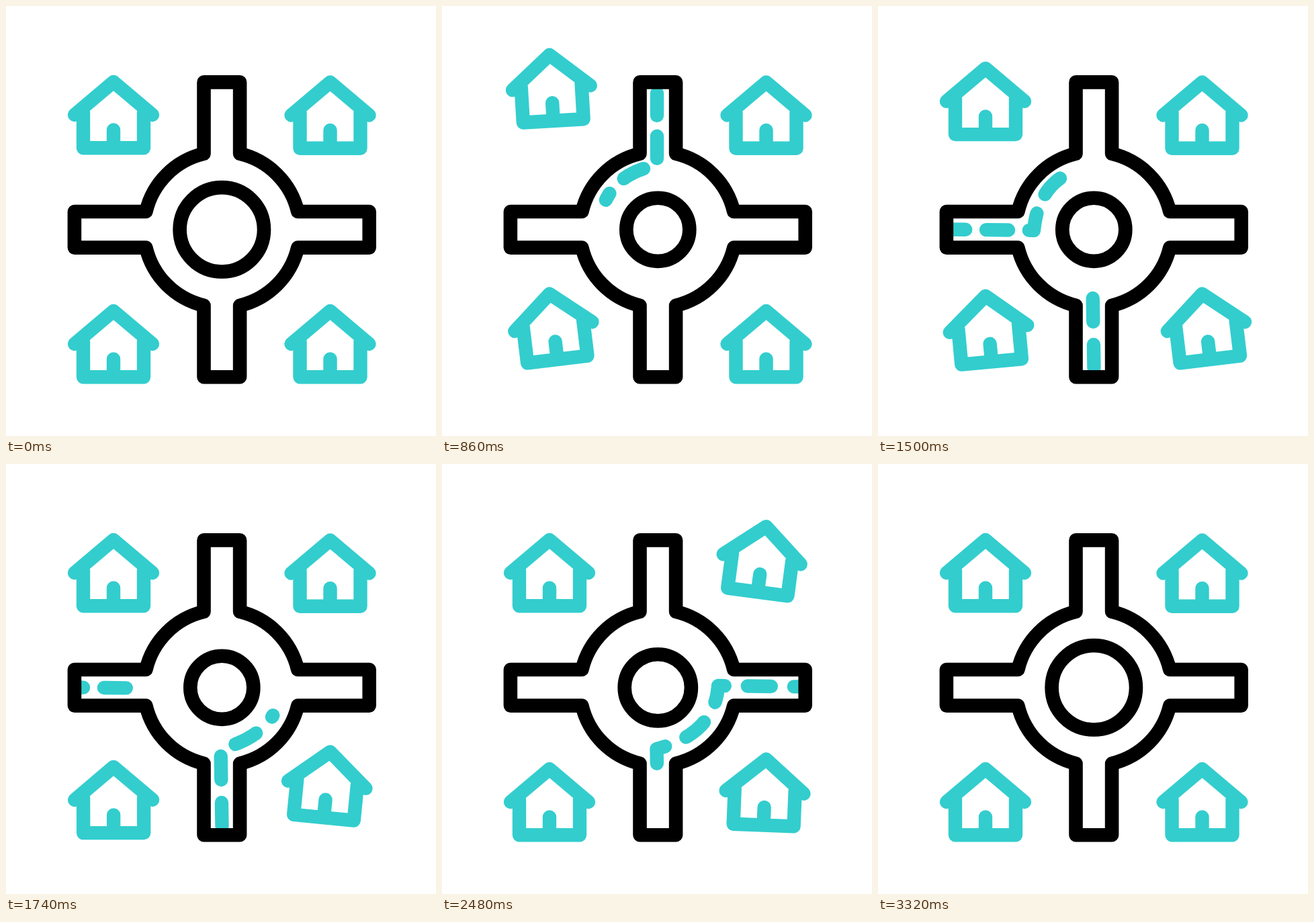
These frames come from a looping animation (640 by 640 pixels, 3.5 s). An HTML page with a canvas:

```html
<!DOCTYPE html>
<html lang="en">
<head>
<meta charset="utf-8">
<title>Roundabout</title>
<style>
html, body { margin: 0; width: 100%; height: 100%; overflow: hidden; background: #fff; }
canvas { display: block; width: 640px; height: 640px; }
</style>
</head>
<body>
<canvas id="stage" width="640" height="640"></canvas>
<script>
const ctx = document.getElementById('stage').getContext('2d');
const LOOP = 3500, STEP = 20, RISE = 180;
const TEAL = '#33cdce', INK = '#000';
const CX = 321.3, CY = 332.8;

const ramp = (t, from, to) => Math.min(1, Math.max(0, (t - from) / (to - from)));
const ease = p => (1 - Math.cos(Math.PI * p)) / 2;

// A sine swing that freezes after a number of turns; 3/4 turn holds at -1.
function swing(t, from, period, turns) {
  const n = Math.min(turns, Math.max(0, (t - from) / period));
  return Math.sin(2 * Math.PI * n);
}

// Each house hangs from its roof peak (x, y). The upper ones rock to rest,
// the lower ones stay leaning until they drop.
const houses = [
  { x: 160, y: 113, lift: 40.2, up: 220, down: [1400, 1600],
    amp: -8, from: 309, period: 385, turns: 3 },
  { x: 160, y: 454, lift: 25.5, up: 370, down: [1400, 1840],
    amp: 6.9, from: 370, period: 640, turns: 0.75 },
  { x: 482.5, y: 454, lift: 25.5, up: 1320, down: [2280, 2720],
    amp: -7, from: 1320, period: 649, turns: 0.75 },
  { x: 482.5, y: 113.5, lift: 20.4, up: 1900, down: [2920, 3300],
    amp: 8, from: 1948, period: 447, turns: 2 }
];

// A lane is a straight run, a curve around the island, and a straight exit.
function lane(start, [p, c1, c2, q], end) {
  const pts = [start];
  for (let i = 0; i <= 40; i++) {
    const u = i / 40, v = 1 - u;
    pts.push([0, 1].map(k =>
      v * v * v * p[k] + 3 * v * v * u * c1[k] + 3 * v * u * u * c2[k] + u * u * u * q[k]));
  }
  pts.push(end);
  const dist = [0];
  for (let i = 1; i < pts.length; i++) {
    dist.push(dist[i - 1] + Math.hypot(pts[i][0] - pts[i - 1][0], pts[i][1] - pts[i - 1][1]));
  }
  return { pts, dist, total: dist[dist.length - 1] };
}

const trips = [
  { lane: lane([320, 130], [[320, 237], [274, 246], [238, 270], [232, 334]], [105, 332.5]),
    dash: [33, 30.8], grow: [400, 1255], clear: [1231, 1864] },
  { lane: lane([321.5, 539], [[319.5, 424], [378, 409], [408, 376], [411, 330]], [538, 331.5]),
    dash: [35, 34], grow: [1252, 2144], clear: [2300, 3040] }
];

function pointOn({ pts, dist }, s) {
  let i = 1;
  while (i < dist.length - 1 && dist[i] < s) i++;
  const u = (s - dist[i - 1]) / (dist[i] - dist[i - 1]);
  return [0, 1].map(k => pts[i - 1][k] + (pts[i][k] - pts[i - 1][k]) * u);
}

// The dashes start at the tail, so they travel only while the tail moves.
function drawTrip(trip, t) {
  const path = trip.lane;
  const head = path.total * ramp(t, ...trip.grow);
  const tail = path.total * ramp(t, ...trip.clear);
  if (head - tail < 0.5) return;
  ctx.beginPath();
  ctx.moveTo(...pointOn(path, tail));
  path.pts.forEach((p, i) => {
    if (path.dist[i] > tail && path.dist[i] < head) ctx.lineTo(...p);
  });
  ctx.lineTo(...pointOn(path, head));
  ctx.setLineDash(trip.dash);
  ctx.stroke();
  ctx.setLineDash([]);
}

// One arm of the crossing plus the arc to the next one, turned four times.
function drawRoad() {
  const half = 26.8, r = 116.1, reach = 219.4;
  const gap = Math.asin(half / r), near = Math.sqrt(r * r - half * half);
  ctx.save();
  ctx.translate(CX, CY);
  ctx.beginPath();
  for (let i = 0; i < 4; i++) {
    ctx.lineTo(-half, -near);
    ctx.lineTo(-half, -reach);
    ctx.lineTo(half, -reach);
    ctx.lineTo(half, -near);
    ctx.arc(0, 0, r, -Math.PI / 2 + gap, -gap);
    ctx.rotate(Math.PI / 2);
  }
  ctx.closePath();
  ctx.stroke();
  ctx.restore();
}

function drawRing(t) {
  const pulse = swing(t, 220, 500, 0.75) * (1 - ease(ramp(t, 2400, 2700)));
  ctx.beginPath();
  ctx.arc(CX, CY, 62.7 * (1 + pulse / 4), 0, Math.PI * 2);
  ctx.stroke();
}

function drawHouse(h, t) {
  const level = ease(ramp(t, h.up, h.up + RISE)) * (1 - ease(ramp(t, ...h.down)));
  const tilt = h.amp * swing(t, h.from, h.period, h.turns) * level * level;
  ctx.save();
  ctx.translate(h.x, h.y - h.lift * level);
  ctx.rotate(tilt * Math.PI / 180);
  ctx.beginPath();
  ctx.moveTo(-58, 49);
  ctx.lineTo(0, 0);
  ctx.lineTo(58, 49);
  ctx.moveTo(-45, 45);
  ctx.lineTo(-45, 98.2);
  ctx.lineTo(45, 98.2);
  ctx.lineTo(45, 45);
  ctx.moveTo(0, 71.5);
  ctx.lineTo(0, 98.2);
  ctx.stroke();
  ctx.restore();
}

function draw(t) {
  ctx.fillStyle = '#fff';
  ctx.fillRect(0, 0, 640, 640);
  ctx.lineCap = ctx.lineJoin = 'round';

  ctx.strokeStyle = TEAL;
  ctx.lineWidth = 20.4;
  trips.forEach(trip => drawTrip(trip, t));
  houses.forEach(h => drawHouse(h, t));

  ctx.strokeStyle = INK;
  ctx.lineWidth = 20.6;
  drawRoad();
  drawRing(t);
}

const begin = performance.now();
function tick() {
  const t = (performance.now() - begin) % LOOP;
  draw(Math.floor(t / STEP) * STEP);
  requestAnimationFrame(tick);
}
tick();
</script>
</body>
</html>
```
